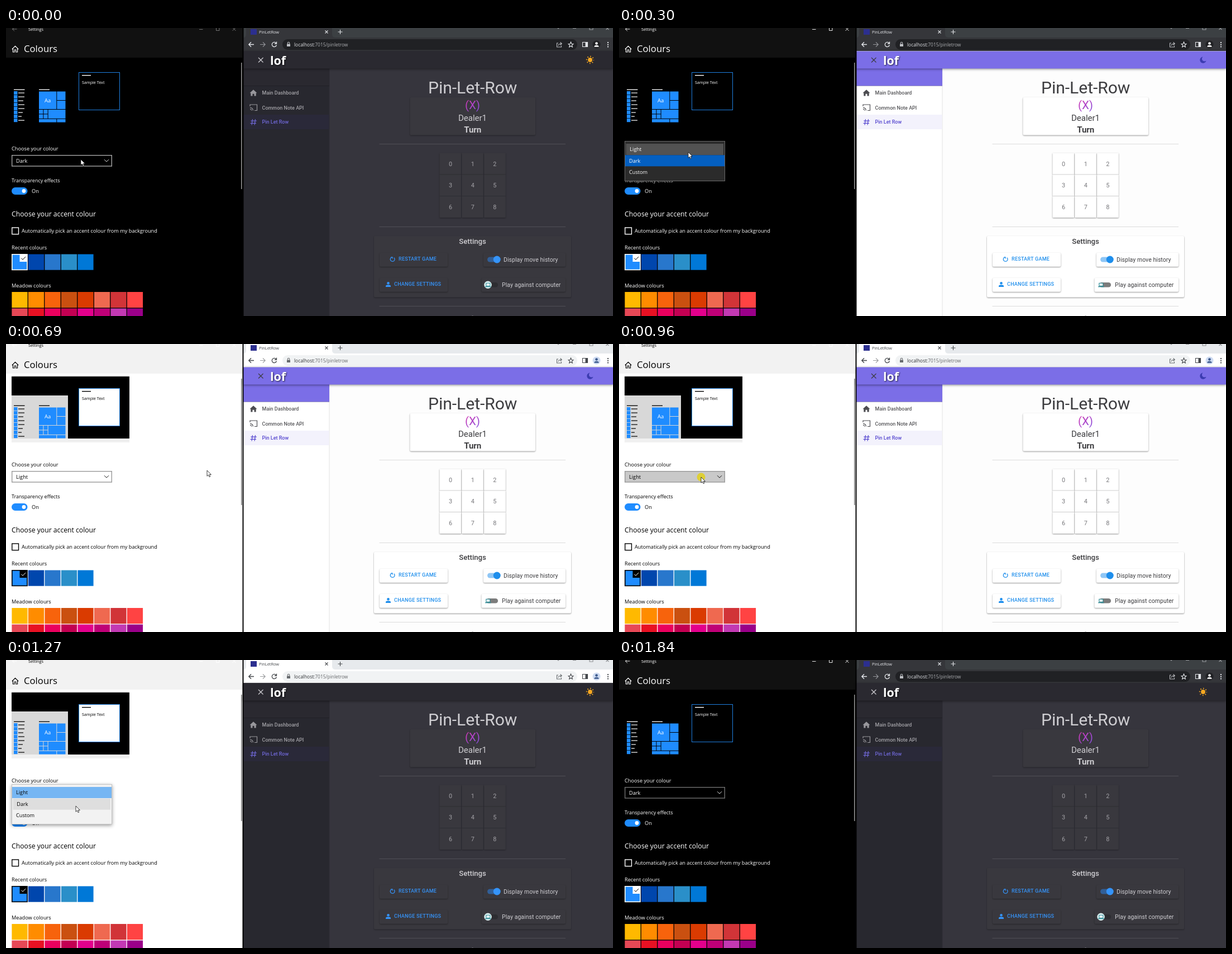
An HTML page that plays this animation: 1087 px wide and 515 px high, repeating every 1910 ms.

```html
<!DOCTYPE html>
<html lang="en">
<head>
<meta charset="utf-8">
<title>Theme switch</title>
<style>
html, body { margin: 0; width: 100%; height: 100%; overflow: hidden; background: #000; }
svg { display: block; }
text { white-space: pre; }
.line { fill: none; }
.mid { text-anchor: middle; }

#settings { --bg: #fff; --fg: #000; --box: #fff; --edge: #999; --edgeOver: #666; --press: #c9c9c9; --win: #fff;
  --bar: #777; --menu: #f2f2f2; --menuEdge: #c4c4c4; --pick: #76b6f3; --over: #dedede;
  font: 9.2px "Open Sans", "Noto Sans", sans-serif; fill: var(--fg); }
#settings.dark { --bg: #000; --fg: #fff; --box: #000; --edge: #707070; --edgeOver: #a6a6a6; --press: #333; --win: #000;
  --bar: #9a9a9a; --menu: #2b2b2b; --menuEdge: #6a6a6a; --pick: #045fc0; --over: #525252; }
#settings .line { stroke: var(--fg); }
#settings.dark .desktop { display: none; }
.tile { fill: #1f8cff; }

#chrome { --strip: #e7eaed; --bar: #fff; --pill: #f1f3f4; --fg: #45484c; --url: #303236; --face: #3c5a8c; --ring: #cfdcf2;
  font: 7.4px "Open Sans", "Noto Sans", sans-serif; fill: var(--fg); }
#chrome.dark { --strip: #3c4043; --bar: #35363a; --pill: #202124; --fg: #e4e6ea; --url: #dfe1e5; --face: #fff; --ring: #202124; }
#chrome .line { stroke: var(--fg); stroke-width: 1.1; }

#app { --bg: #fdfdfd; --head: #7b6ee7; --side: #fff; --edge: #e3e3e3; --fg: #3c3c3f; --icon: #4c4c50; --pick: #5546cf;
  --pickBg: #f3f2fc; --card: #fff; --num: #77777b; --rule: #dcdcdc; --act: #1e8eec; --track: #8fc6f5; --off: #7c7c7c; --dim: .42;
  font: 10.4px Roboto, "Liberation Sans", sans-serif; fill: var(--fg); }
#app.dark { --bg: #36353d; --head: #2a2930; --side: #28282f; --edge: #2d2c34; --fg: #cfced2; --icon: #98979c; --pick: #7068d8;
  --pickBg: #2a2939; --card: #39383e; --num: #a3a2a7; --rule: #504f56; --act: #3594fa; --track: #315f98; --off: #2d2d31; --dim: .34; }
#app .card { fill: var(--card); filter: drop-shadow(0 1px 1.2px rgba(0, 0, 0, var(--dim))); }
#app .menu { font-size: 9px; font-weight: 500; fill: var(--num); }
#app:not(.dark) .menu { fill: #565659; }
#app .btn { font-size: 9px; font-weight: 500; letter-spacing: .26px; fill: var(--act); }
#app .rule { fill: var(--rule); }
#app.dark .moon, #app:not(.dark) .sun { display: none; }
#app .word { font: bold 21.5px "Open Sans", "Noto Sans", sans-serif; fill: #fff; filter: drop-shadow(1px 1px 1px #000b); }
</style>
</head>
<body>
<svg id="stage" width="1087" height="515" viewBox="0 0 1087 515">
  <defs>
    <linearGradient id="mark" x1="0" y1="0" x2="1" y2="1">
      <stop offset=".1" stop-color="#cf38b4"/><stop offset="1" stop-color="#8453e0"/>
    </linearGradient>
  </defs>

  <g id="settings" class="dark">
    <rect width="424" height="515" fill="var(--bg)"/>
    <rect id="head" width="424" height="53"/>
    <path id="caption" d="M19.5 2H11.5M15 -1.5L11.5 2L15 5.5M346 2.5H352.5M376.5 -2H382V4.5H376.5ZM405.5 -1L411.5 5M411.5 -1L405.5 5" fill="none" stroke="#fff" stroke-width=".9"/>
    <text x="40" y="5" font-size="7.3">Settings</text>
    <path class="line" d="M10.8 38L16.5 32.3L22.2 38M12.4 37V43H15.2V39H17.8V43H20.6V37" stroke-width="1.1"/>
    <text x="32" y="43.3" font-size="16.7">Colours</text>
    <rect x="421" y="62" width="1.5" height="226" fill="var(--bar)"/>

    <g class="desktop">
      <rect x="10" y="58" width="211" height="111" fill="#000"/>
      <rect x="10" y="92" width="101" height="77" fill="#d8d8d8"/>
      <rect x="10" y="169" width="211" height="7" fill="#f0f0f0"/>
    </g>
    <g id="preview"></g>
    <text x="74.7" y="133.3" class="mid" font-size="9.5" style="fill:#fff">Aa</text>
    <rect x="130.5" y="79.5" width="73" height="67" fill="var(--win)" stroke="#1f7fe0"/>
    <rect x="136" y="84" width="16" height="1.4"/>
    <text x="136" y="100.2" font-size="7.2">Sample Text</text>

    <text x="10" y="219.3">Choose your colour</text>
    <rect id="select" x="10.7" y="227.7" width="178.6" height="19.3" stroke-width="1.4"/>
    <text id="choice" x="18" y="240.7">Dark</text>
    <path class="line" d="M176 235.2L180 239.2L184 235.2" stroke-width=".9"/>

    <text x="10" y="275.8" font-size="9">Transparency effects</text>
    <rect x="10" y="285" width="28.5" height="13" rx="6.5" class="tile"/>
    <circle cx="32" cy="291.5" r="3.4" fill="#fff"/>
    <text x="46" y="295">On</text>

    <text x="10" y="336.6" font-size="12.2">Choose your accent colour</text>
    <rect class="line" x="10.8" y="357" width="11.7" height="11.7" stroke-width="1.4"/>
    <text x="28" y="366.4">Automatically pick an accent colour from my background</text>
    <text x="10" y="396.4">Recent colours</text>
    <text x="10" y="463.6">Meadow colours</text>
    <g id="swatches"></g>
    <rect class="line" x="10.8" y="404.8" width="27.2" height="27.6" stroke-width="1.6"/>
    <rect x="24.5" y="405" width="13.5" height="13"/>
    <path d="M27.3 411.6L30 414.3L35 409" fill="none" stroke="var(--bg)"/>

    <g id="menu">
      <rect x="10.5" y=".5" width="179" height="71" fill="var(--menu)" stroke="var(--menuEdge)" style="filter:drop-shadow(0 2px 3px #0006)"/>
      <rect id="picked" x="11" width="178" height="20" fill="var(--pick)"/>
      <rect id="hovered" x="12.5" width="174.5" height="20" fill="var(--over)"/>
      <text x="18" y="18.3">Light</text>
      <text x="18" y="38.9">Dark</text>
      <text x="18" y="59.4">Custom</text>
    </g>
  </g>

  <g id="chrome" class="dark">
    <rect x="425" width="662" height="18" fill="var(--strip)"/>
    <path d="M425 17Q430 17 430 11V0H584V11Q584 17 590 17H1087V42H425Z" fill="var(--bar)"/>
    <rect x="438" y="2" width="11" height="10" fill="#2c2f8f"/>
    <text x="453" y="9.8">PinLetRow</text>
    <path class="line" d="M571.5 4.5L576.5 9.5M576.5 4.5L571.5 9.5M594.5 7H602.5M598.5 3V11"/>
    <path class="line" d="M987 -1L989 1L991 -1M1015 .5H1021M1045 -2H1051V3H1045ZM1074.5 -2L1079.5 3M1079.5 -2L1074.5 3" opacity=".55"/>
    <rect x="495" y="20" width="528" height="19" rx="9.5" fill="var(--pill)"/>
    <path class="line" d="M444 29.5H435M439 25.3L434.8 29.5L439 33.7" style="stroke-width:1.4"/>
    <path class="line" d="M455 29.5H464M460 25.3L464.2 29.5L460 33.7" opacity=".55"/>
    <path class="line" d="M483.7 27A4.1 4.1 0 1 0 484.4 30.5M484.5 24.5V28H481" style="stroke-width:1.3"/>
    <rect x="503" y="28.5" width="6" height="4.5" rx=".6" opacity=".8"/>
    <path class="line" d="M504.3 28.5V27A1.7 1.7 0 0 1 507.7 27V28.5" opacity=".8"/>
    <text x="516" y="32.9" font-size="8.4" style="fill:var(--url)">localhost:<tspan opacity=".72">7015/pinletrow</tspan></text>
    <path class="line" d="M989 27H986.5V34H994.5V31.5M989 31.5Q989.5 28 995 28M992.5 25.5L995.3 28L992.5 30.5" opacity=".8"/>
    <path class="line" d="M1011.5 25L1012.8 28.2L1016 28.5L1013.5 30.7L1014.3 34L1011.5 32.2L1008.7 34L1009.5 30.7L1007 28.5L1010.2 28.2Z"/>
    <path class="line" d="M1032.5 25.5H1041.5V33.5H1032.5Z"/>
    <rect x="1037.5" y="25.5" width="4" height="8"/>
    <circle cx="1057.5" cy="29.5" r="7" fill="var(--ring)"/>
    <path d="M1053.3 33.8Q1053.3 30.7 1057.5 30.7T1061.7 33.8Z" fill="var(--face)"/>
    <circle cx="1057.5" cy="27.5" r="2.3" fill="var(--face)"/>
    <path d="M1077 25h2v2h-2zM1077 28.7h2v2h-2zM1077 32.4h2v2h-2z"/>
  </g>

  <g id="app" class="dark">
    <rect x="425" y="41" width="662" height="474" fill="var(--bg)"/>
    <rect x="425" y="72" width="154" height="443" fill="var(--side)"/>
    <rect x="578.5" y="72" width="1" height="443" fill="var(--edge)"/>
    <rect x="425" y="72" width="154" height="31.5" fill="var(--head)"/>
    <rect x="425" y="103" width="154" height="1" opacity=".2" fill="#000"/>
    <rect x="425" y="41.5" width="662" height="31" fill="var(--head)" style="filter:drop-shadow(0 1px 2px #0007)"/>
    <path d="M452 53L460.5 61.5M460.5 53L452 61.5" fill="none" stroke="var(--fg)" stroke-width="1.2"/>
    <text class="word" x="473" y="65.7">lof</text>
    <g class="sun">
      <circle cx="1046" cy="57" r="3.9" fill="#f6a821"/>
      <circle cx="1046" cy="57" r="6.2" fill="none" stroke="#f6a821" stroke-width="1.9" stroke-dasharray="1.6 3.27" stroke-dashoffset=".8"/>
    </g>
    <path class="moon" d="M1045.5 51.5A5.7 5.7 0 1 0 1051.5 58.5A4.3 4.3 0 0 1 1045.5 51.5Z" fill="#3b3bb0"/>

    <rect x="425" y="155" width="153.5" height="26" fill="var(--pickBg)"/>
    <path d="M443 110.3L449.5 116.2H447.7V121.5H444.5V117.8H441.5V121.5H438.3V116.2H436.5Z" fill="var(--icon)"/>
    <path d="M437 140V137H449.5V147.5H445M437 142.3Q442 142.5 442.4 147.5M437 145Q439.5 145.2 439.7 147.5" fill="none" stroke="var(--icon)" stroke-width="1.2"/>
    <path d="M441.5 163L440 173.5M446.5 163L445 173.5M438.3 166.2H448.8M437.5 170.4H448" fill="none" stroke="var(--pick)" stroke-width="1.2"/>
    <text class="menu" x="458.5" y="119.4">Main Dashboard</text>
    <text class="menu" x="458.5" y="145.6">Common Note API</text>
    <text class="menu" x="458.5" y="171.4" style="fill:var(--pick)">Pin Let Row</text>

    <text class="mid" x="835.7" y="116.8" font-size="30">Pin-Let-Row</text>
    <rect class="card" x="723.5" y="124" width="224.5" height="67.5" rx="2"/>
    <text class="mid" x="835.5" y="145" font-size="20.5" fill="url(#mark)">(X)</text>
    <text class="mid" x="835.5" y="166.3" font-size="15">Dealer1</text>
    <text class="mid" x="835.7" y="187" font-size="15" font-weight="700">Turn</text>
    <g id="rules"></g>
    <g id="board"></g>

    <rect class="card" x="659" y="372" width="353" height="109.5" rx="2"/>
    <text class="mid" x="835.5" y="386.3" font-size="13.1" font-weight="500">Settings</text>
    <g id="buttons"></g>
    <path d="M689.7 410.5A3.9 3.9 0 1 0 694.8 410.7M689.3 410H692V412.6" fill="none" stroke="var(--act)" stroke-width="1.3"/>
    <text class="btn" x="703" y="416.4">RESTART GAME</text>
    <path d="M680 463V461.7Q680 459.3 684.5 459.3T689 461.7V463Z" fill="var(--act)"/>
    <circle cx="684.5" cy="456.3" r="2.3" fill="var(--act)"/>
    <text class="btn" x="695" y="461.4">CHANGE SETTINGS</text>
    <rect x="862" y="409.5" width="22" height="9" rx="4.5" fill="var(--track)"/>
    <circle cx="879.2" cy="414" r="6.5" fill="var(--act)"/>
    <text x="891" y="417.7" letter-spacing=".1">Display move history</text>
    <rect x="860" y="455" width="21" height="8.6" rx="4.3" fill="var(--off)"/>
    <circle class="sun" cx="863" cy="459.2" r="6.7" fill="#dff3f3"/>
    <path d="M859.8 456.3H866.8V461.3H859.8ZM858 462.6H868.6" fill="#f4fbfb" stroke="#2b8792" stroke-width="1.1"/>
    <text x="888" y="462.7" letter-spacing=".1">Play against computer</text>
    <rect x="834.5" y="514" width="2" height="1" opacity=".35"/>
  </g>

  <rect x="423.5" width="2" height="515" fill="#000"/>
  <g id="cursor">
    <circle id="click" r="7.5" fill="#e0cf25" opacity=".9"/>
    <path d="M0 0V10.3L2.4 8.1L4.1 11.8L5.8 11L4.2 7.5H7.4Z" fill="#fff" stroke="#111" stroke-width=".8"/>
  </g>
</svg>
<script>
const $ = id => document.getElementById(id);

function add(parent, tag, attrs, text = "") {
  const el = document.createElementNS("http://www.w3.org/2000/svg", tag);
  for (const k in attrs) el.setAttribute(k, attrs[k]);
  el.textContent = text;
  $(parent).append(el);
}
const box = (parent, x, y, width, height, more) => add(parent, "rect", { x, y, width, height, ...more });

// Start menu preview
box("preview", 14, 109.6, 19.5, 1.3);
box("preview", 59, 109.6, 19, 1.3);
[11, 11, 9, 11, 11, 8, 6, 11].forEach((w, i) => {
  box("preview", 14, 113 + 7 * i, 6.5, 6.2, { class: "tile" });
  box("preview", 22, 115.5 + 7 * i, w, 1.2);
});
for (const [x, y, w, h] of [[59, 113.5, 31.3, 31.5], [91.3, 113.5, 15.2, 15.5], [91.3, 130, 15.2, 15],
  [59, 146, 7.4, 7.4], [67.4, 146, 7.2, 7.4], [59, 154.4, 7.4, 7.4], [67.4, 154.4, 7.2, 7.4],
  [75.6, 146, 30.9, 15.8], [59, 162.8, 31.3, 5.8], [91.3, 162.8, 15.2, 5.8]])
  box("preview", x, y, w, h, { class: "tile" });

// Colour swatches
[[404.5, "1f8cff 0046ad 2877cc 2a8fc9 0078d7"],
 [472, "ffb900 ff8c00 f7630c ca5010 da3b01 ef6950 d13438 ff4343"],
 [501.5, "e74856 e81123 ea005e c30052 e3008c bf0077 c239b3 9a0089"]]
  .forEach(([y, row]) => row.split(" ").forEach((c, i) =>
    box("swatches", 10.4 + 29.5 * i, y, 28.2, 28.2, { fill: "#" + c })));

// Game page
for (const y of [207, 355, 497]) box("rules", 668.5, y, 333.5, 1, { class: "rule" });
const cells = [...Array(9).keys()].map(i => [i, i % 3, Math.floor(i / 3)]);
for (const [, col, row] of cells)
  box("board", 776.5 + 39.8 * col, 223.5 + 38.7 * row, 38.6, 38.2, { class: "card", rx: 1 });
for (const [i, col, row] of cells)
  add("board", "text", { class: "mid", x: 796 + 39.7 * col, y: 246.6 + 38.5 * row,
    "font-size": 10.8, style: "fill:var(--num)" }, i);
for (const [x, y, w] of [[669, 402, 122], [669, 447, 122], [855, 402, 147], [851.5, 447, 150.5]])
  box("buttons", x, y, w, 24.7, { class: "card", rx: 2 });

// [start ms, cursor x, cursor y, header grey, select mode]
const LOOP = 1910;
const steps = [
  [0, 134, 235, 17, "hover"], [70, 134, 235, 17, "click"], [140, 132, 232, 17, "open"],
  [230, 126, 225, 17, "over"], [300, 124, 222, 17, "over"], [420, 290, 220, 45, ""],
  [490, 461, 217, 114, ""], [560, 461, 217, 180, ""], [620, 440, 219, 225, ""],
  [690, 360, 226, 242, ""], [760, 250, 232, 242, ""], [890, 165, 236, 242, "hover"],
  [960, 147, 238, 242, "click"], [1030, 146, 239, 242, "open"], [1090, 136, 250, 242, "open"],
  [1170, 128, 258, 242, "over"], [1230, 125, 261, 242, "over"], [1270, 125, 261, 242, "over"],
  [1310, 290, 257, 214, ""], [1380, 443, 253, 153, ""], [1450, 443, 253, 90, ""],
  [1540, 442, 255, 40, ""], [1650, 441.5, 256.5, 17, ""]
];
const show = (id, on) => $(id).style.display = on ? "" : "none";

function draw(t) {
  const [, x, y, grey, mode] = steps.findLast(s => s[0] <= t);
  const dark = t < 420 || t >= 1310;
  const over = mode === "over";
  $("settings").classList.toggle("dark", dark);
  $("chrome").classList.toggle("dark", dark);
  $("app").classList.toggle("dark", t < 300 || t >= 1270);

  $("head").setAttribute("fill", `rgb(${grey},${grey},${grey})`);
  $("caption").setAttribute("opacity", t < 70 ? .45 : 1);
  $("choice").textContent = dark ? "Dark" : "Light";
  $("select").setAttribute("fill", mode === "click" ? "var(--press)" : "var(--box)");
  $("select").setAttribute("stroke", mode === "hover" ? "var(--edgeOver)" : "var(--edge)");

  show("menu", over || mode === "open");
  show("hovered", over);
  $("menu").setAttribute("transform", `translate(0 ${dark ? 202 : 222})`);
  $("picked").setAttribute("y", dark ? 25.3 : 5);
  $("hovered").setAttribute("y", dark ? 5 : 25.7);
  const [light, night] = $("menu").querySelectorAll("text");
  light.setAttribute("x", over && dark ? 19.3 : 18);
  night.setAttribute("x", over && !dark ? 19.3 : 18);

  show("cursor", t < 1840);
  show("click", mode === "click");
  $("cursor").setAttribute("transform", `translate(${x} ${y})`);
}

const start = performance.now();
function tick() {
  draw((performance.now() - start) % LOOP);
  requestAnimationFrame(tick);
}
tick();
</script>
</body>
</html>
```
